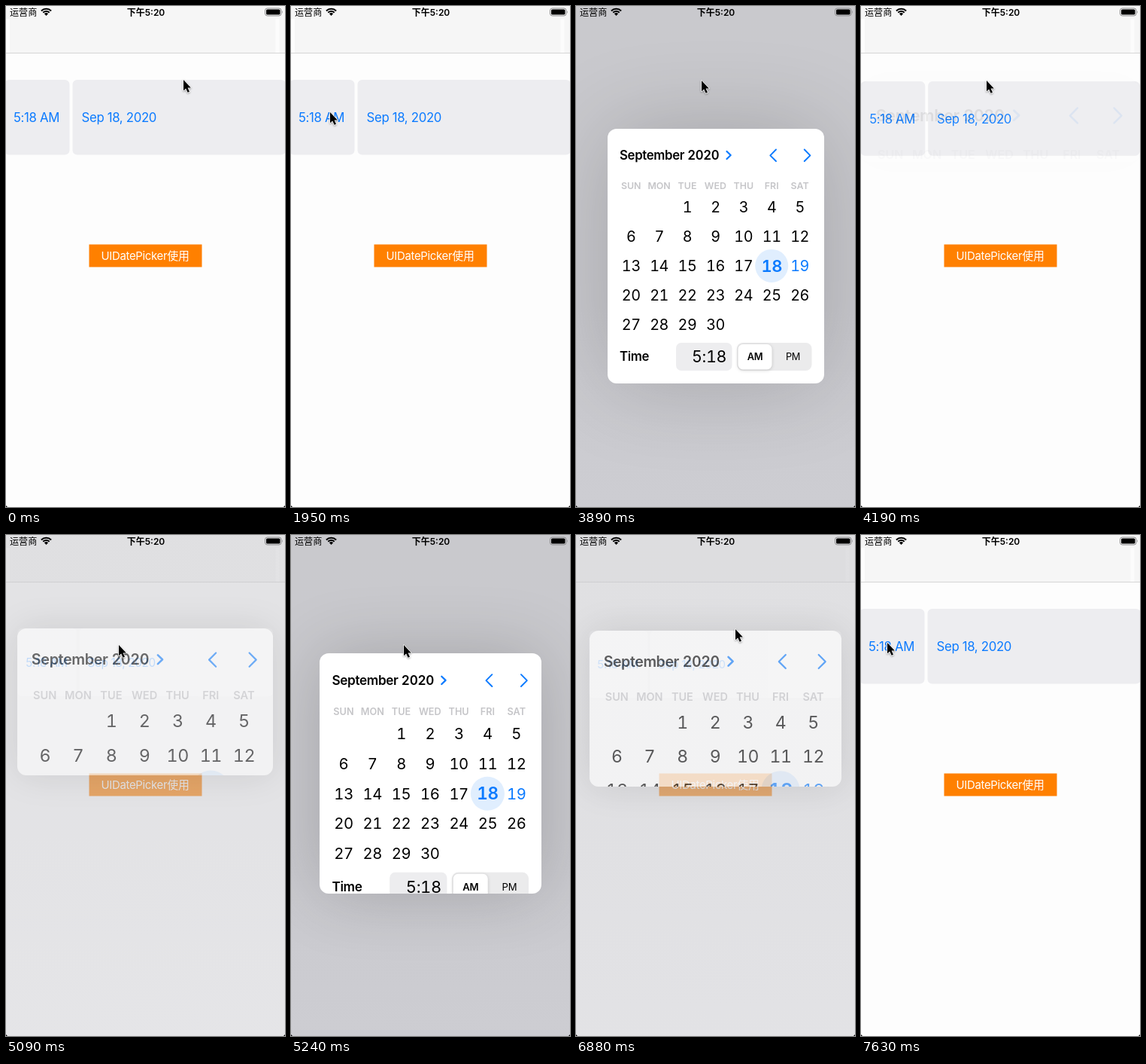
Animation, 371 px wide and 665 px high, one loop 8 s. Source, as an HTML page:

```html
<!DOCTYPE html>
<html lang="zh-CN">
<head>
<meta charset="utf-8">
<title>UIDatePicker</title>
<style>
  html, body { margin: 0; width: 100%; height: 100%; overflow: hidden; background: #fdfdfd; }
  #stage { position: relative; width: 371px; height: 665px; overflow: hidden; background: #fdfdfd; }
  #stage > * { position: absolute; left: 0; top: 0; }
  svg { display: block; overflow: visible; }
  text { font-family: Inter, "Noto Sans CJK SC", "Noto Sans CJK", sans-serif; letter-spacing: -.02em; white-space: pre; }
  #dim { width: 371px; height: 665px; background: linear-gradient(#c9c9cd, #c9c9ce 60%, #cdcdd2); }
  #cells { transform-origin: -2px 98px; }
  #card { overflow: hidden; border-radius: 12px; background: #fff; }
  #sheet { width: 288px; height: 338px; transform-origin: 0 0; }
  #sheet text { font-feature-settings: "tnum"; }
</style>
</head>
<body>
<div id="stage">
  <svg id="page" width="371" height="665"></svg>
  <div id="dim"></div>
  <svg id="cells" width="371" height="665"></svg>
  <div id="card"><svg id="sheet" viewBox="0 0 288 338"></svg></div>
  <svg id="status" width="371" height="665"></svg>
  <svg id="cursor" width="14" height="20">
    <path d="M0 0V14.2L3.2 11.4 5.6 16.8 8 15.8 5.6 10.5H9.9Z" fill="#000" stroke="#fff"
      stroke-width="1.6" paint-order="stroke" stroke-linejoin="round"
      style="filter:drop-shadow(0 1px 1px rgba(0,0,0,.35))"/>
  </svg>
</div>
<script>
const $ = id => document.getElementById(id);
const BLUE = '#0a7aff';

// Text placed by its vertical middle.
const label = (str, x, y, size, { fill = '#000', weight = 400, anchor = 'start', extra = '' } = {}) =>
  `<text x="${x}" y="${y + size * .36}" font-size="${size}" font-weight="${weight}" fill="${fill}" text-anchor="${anchor}" ${extra}>${str}</text>`;
const box = (x, y, w, h, fill, r = 0, extra = '') =>
  `<rect x="${x}" y="${y}" width="${w}" height="${h}" rx="${r}" fill="${fill}" ${extra}/>`;
const line = (d, width) =>
  `<path d="${d}" fill="none" stroke="${BLUE}" stroke-width="${width}" stroke-linecap="round" stroke-linejoin="round"/>`;
const mid = { anchor: 'middle' };
const loose = 'style="letter-spacing:0"';

$('page').innerHTML =
  box(0, 0, 371, 62, '#f6f6f6') +
  box(0, 17, 5, 45, '#fdfdfd') + box(358.5, 17, 5, 45, '#fcfcfc') +
  box(0, 62, 371, 1, '#d6d6d6') +
  box(110.5, 316.5, 150, 30, '#ff8000') +
  label('UIDatePicker使用', 185, 331.5, 14.9, { ...mid, fill: '#fff' });

$('cells').innerHTML =
  box(-2, 98, 86.5, 99.5, '#ededf0', 6) + box(88.5, 98, 283.5, 99.5, '#ededf0', 6) +
  label('5:18 AM', 10, 148, 16.8, { fill: BLUE }) +
  label('Sep 18, 2020', 100.5, 148, 16.8, { fill: BLUE });

const wifiArc = r => {
  const d = r * Math.SQRT1_2;
  return `<path d="M${53.5 - d} ${13 - d}A${r} ${r} 0 0 1 ${53.5 + d} ${13 - d}" fill="none" stroke="#000" stroke-width="2"/>`;
};
$('status').innerHTML =
  label('运营商', 5, 8.2, 12.1, { extra: loose }) +
  wifiArc(9.3) + wifiArc(5.9) +
  '<path d="M53.5 13L50.9 10.3A3.7 3.7 0 0 1 56.1 10.3Z"/>' +
  label('下午5:20', 186, 8.2, 12, { ...mid, weight: 600, extra: loose }) +
  box(344.5, 3, 21.5, 10, 'none', 3, 'stroke="#8e8e90"') +
  box(346, 4.5, 18.5, 7, '#000', 1.6) +
  '<path d="M367.2 6.2Q368.8 8 367.2 9.8Z" fill="#8e8e90"/>' +
  '<path d="M0 663V665H2ZM371 663V665H369Z"/>';

function calendar() {
  const colX = c => 31.2 + c * 37.4, rowY = r => 104.3 + r * 38.8;
  let s = label('September 2020', 16, 35, 16.8, { weight: 600 }) +
    line('M158.5 30L163.7 35 158.5 40', 2.2) +
    line('M224 27.5L216.3 35.3 224 43', 1.9) +
    line('M261.7 27.5L269.4 35.3 261.7 43', 1.9);
  'SUN MON TUE WED THU FRI SAT'.split(' ').forEach((d, c) => {
    s += label(d, colX(c), 75.5, 12.4, { ...mid, weight: 600, fill: '#c5c5c8', extra: loose });
  });
  for (let day = 1; day <= 30; day++) {
    const x = colX((day + 1) % 7), y = rowY(Math.floor((day + 1) / 7));
    if (day === 18) {
      s += `<circle cx="${x}" cy="${y}" r="22" fill="#e0eefe"/>` +
        label(day, x, y, 22, { ...mid, weight: 600, fill: BLUE });
    } else {
      s += label(day, x, y, 19.8, { ...mid, fill: day === 19 ? BLUE : '#000' });
    }
  }
  return s + label('Time', 16, 302.3, 16.8, { weight: 600 }) +
    box(91, 284, 74.5, 37, '#ededef', 7) +
    label('5:18', 158, 302.5, 21.5, { anchor: 'end' }) +
    box(172, 284, 99.5, 37, '#ebebec', 8) +
    box(173.5, 286, 45, 33.5, '#fff', 6.5, 'style="filter:drop-shadow(0 1px 2px rgba(0,0,0,.18))"') +
    label('AM', 196, 302.8, 12.8, { ...mid, weight: 600 }) +
    label('PM', 246.5, 302.8, 12.8, mid);
}
$('sheet').innerHTML = calendar();

const LOOP = 8000, TICK = 150;

// Curved cursor moves: first and last tick, bend point, end point.
const home = [236, 98];
const moves = [
  [150, 600, [-89, 150], [51, 145]],
  [1350, 1950, [400, 167], [52, 141]],
  [3600, 3890, [120, 112], [167, 99]],
  [4490, 4640, [162, 118], [150, 146]],
  [5390, 5540, [154, 148], [158, 150]],
  [5840, 6430, [237, 125], [212, 125]],
  [7180, 7630, [120, 130], [35, 143]]
];

// Sheet states per tick: fold (0 sheet, 1 compact) and opacity.
const opening = [[.6, .55], [.08, 1], [.005, 1], [0, 1]];
const closing = [[.55, .6], [.97, .07], [1, 0]];
const phases = [[2550, opening], [4040, closing], [5090, opening], [6880, closing]];

const mix = (a, b, k) => a + (b - a) * k;

function cursorAt(t) {
  let pos = home;
  for (const [from, to, bend, end] of moves) {
    if (t < from) break;
    const count = Math.round((to - from) / TICK) + 1;
    const gap = (to - from) / (count - 1);
    const k = Math.min(1, (Math.floor((t - from) / gap) + 1) / count);
    pos = pos.map((p, i) => mix(mix(p, bend[i], k), mix(bend[i], end[i], k), k));
  }
  return pos;
}

function sheetAt(t) {
  const phase = phases.findLast(p => p[0] <= t);
  if (!phase) return [1, 0];
  const [from, states] = phase;
  return states[Math.min(states.length - 1, Math.floor((t - from) / TICK))];
}

function draw(t) {
  const [x, y] = cursorAt(t), [fold, alpha] = sheetAt(t);
  const left = mix(41.5, -2, fold), top = mix(162.5, 98, fold);
  const width = mix(288, 374, fold), height = mix(338, 99.5, fold);
  const dim = Math.max(0, (alpha - .1) / .9);

  $('cursor').style.transform = `translate(${Math.round(x)}px,${Math.round(y)}px)`;
  $('dim').style.opacity = dim;
  $('cells').style.opacity = 1 - dim;
  $('cells').style.transform = `translate(${left + 2}px,${top - 98}px) scale(${width / 374})`;
  Object.assign($('card').style, {
    left: left + 'px', top: top + 'px', width: width + 'px', height: height + 'px',
    opacity: alpha,
    boxShadow: `0 0 ${Math.max(50, 120 - 350 * fold)}px rgba(0,0,0,.19)`
  });
  $('sheet').style.transform = `scale(${width / 288})`;
}

const start = performance.now();
function tick(now) {
  draw(Math.max(0, now - start) % LOOP);
  requestAnimationFrame(tick);
}
draw(0);
requestAnimationFrame(tick);
</script>
</body>
</html>
```
